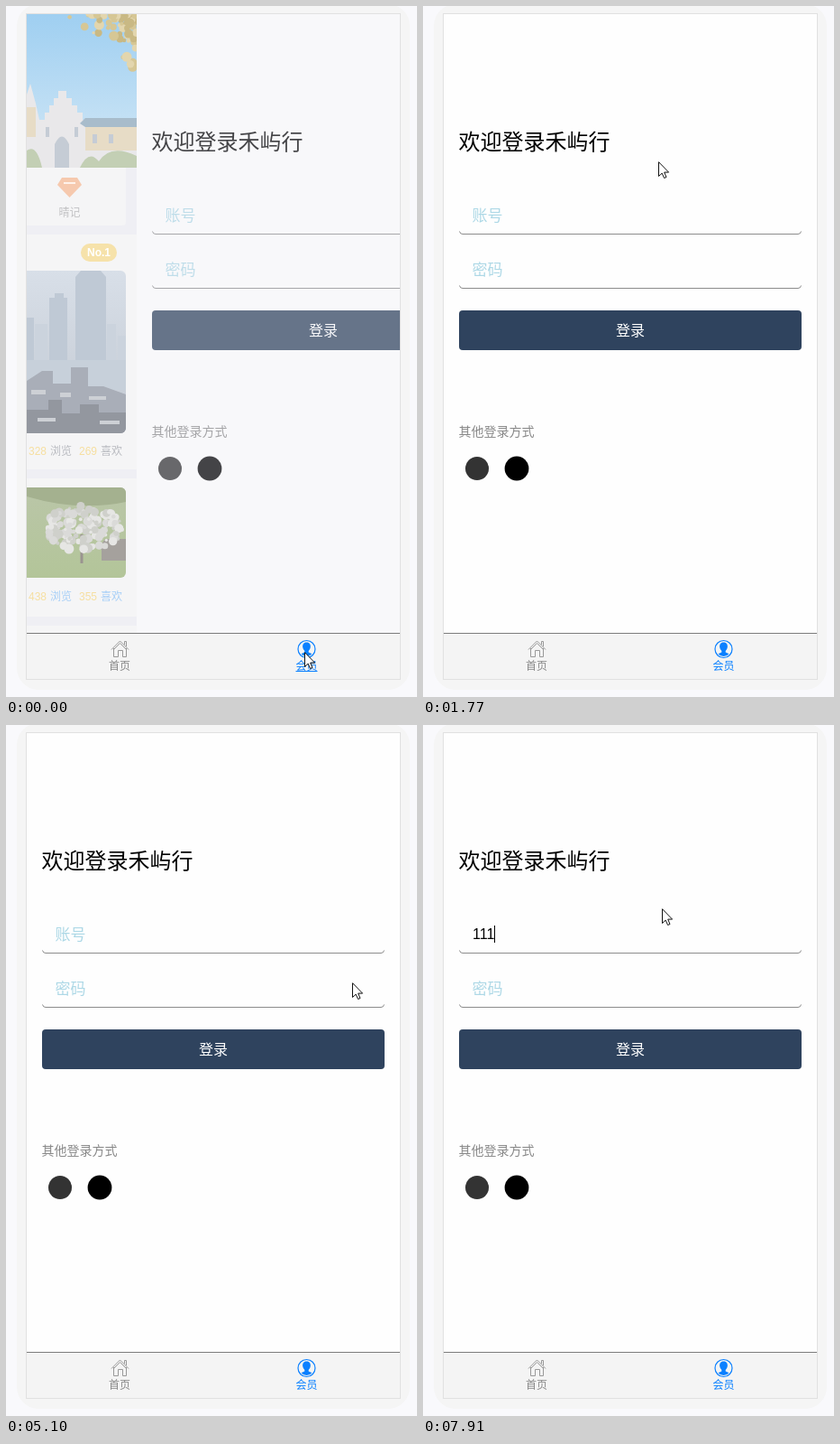
An HTML page for the animation above (7990 ms loop, 456 by 765 pixels).

```html
<!DOCTYPE html>
<html lang="zh-CN">
<head>
<meta charset="utf-8">
<title>登录</title>
<style>
html, body { margin: 0; width: 100%; height: 100%; overflow: hidden; background: #f9f9fc; }
svg { display: block; width: 456px; height: 765px; }
text { font-family: "Noto Sans CJK SC", "Noto Sans CJK", "Noto Sans", sans-serif; white-space: pre; }
.latin { font-family: "Liberation Sans", Arial, sans-serif; }
.mid { text-anchor: middle; }
.line { fill: none; stroke: #8c8c8c; }
.hint { font-size: 17px; fill: #add8e6; }
.small { font-size: 12px; }
.stat { font-size: 12px; font-weight: 500; }
.num { fill: #f6dfa0; }
</style>
</head>
<body>
<svg viewBox="0 0 456 765">
  <defs>
    <clipPath id="view"><rect x="23" y="9" width="414" height="685"/></clipPath>
    <clipPath id="shotA"><rect x="-240" y="293" width="373" height="180" rx="6"/></clipPath>
    <clipPath id="shotB"><rect x="-240" y="533" width="373" height="100" rx="6"/></clipPath>
    <clipPath id="hero"><rect x="-269" y="9" width="414" height="170"/></clipPath>
    <linearGradient id="sky" x2="0" y2="1"><stop stop-color="#9fcff1"/><stop offset="1" stop-color="#d3e8f6"/></linearGradient>
    <linearGradient id="haze" x2="0" y2="1"><stop stop-color="#d8dfe8"/><stop offset="1" stop-color="#c3c9d2"/></linearGradient>
    <linearGradient id="lawn" x2="0" y2="1"><stop stop-color="#bac6a8"/><stop offset="1" stop-color="#b3c599"/></linearGradient>
    <path id="rule" class="line" d="M40.5 249.5Q41 252.5 44 252.5H416Q419 252.5 419.5 249.5"/>
  </defs>

  <rect x="12" y="-2" width="436" height="759" rx="24" fill="#f5f5f5"/>
  <rect x="22.5" y="8.5" width="415" height="737" fill="#ebebf3" stroke="#e1e1e1"/>

  <g clip-path="url(#view)">
    <g id="home">
      <rect x="-269" y="9" width="414" height="685" fill="#efeff4"/>
      <g fill="#f5f5f6">
        <rect x="-257" y="170" width="390" height="73" rx="4"/>
        <rect x="-269" y="253" width="414" height="260"/>
        <rect x="-269" y="523" width="414" height="153"/>
        <rect x="-269" y="686" width="414" height="8"/>
      </g>
      <g clip-path="url(#hero)">
        <rect x="-269" y="9" width="414" height="170" fill="url(#sky)"/>
        <path fill="#eef3f8" d="M-269 150Q60 120 145 128V179H-269Z"/>
        <path fill="#e9e8ea" d="M23 179V98L27 86 33 108 37 126H43V118H48V110H53V102H58V94H67V102H73V110H79V118H85V126H145V179Z"/>
        <path fill="#e7dcc6" d="M88 133H145V160H88ZM23 112H33V145H23Z"/>
        <path fill="#a8bccb" d="M82 130L88 124H145V134H88Z"/>
        <path fill="#c5ccd5" d="M54 179V153Q62 136 70 153V179ZM44 134H48V145H44ZM76 134H80V145H76ZM96 142H101V152H96ZM114 142H119V152H114Z"/>
        <path fill="#c3cfb4" d="M23 179V160Q34 152 40 179ZM82 179Q92 158 103 172Q116 152 145 166V179Z"/>
        <g id="leaves"></g>
      </g>
      <path fill="#f6c9ae" d="M62 190H79L84 198 70.5 212 57 198Z"/>
      <path stroke="#fff2ea" stroke-width="2" d="M64 196H77"/>
      <text class="small mid" x="70.5" y="233" fill="#c2c2c4">晴记</text>

      <rect x="83" y="263" width="40" height="20" rx="10" fill="#f6e2aa"/>
      <text class="small mid latin" x="103" y="277" fill="#fff" font-weight="700">No.1</text>
      <g clip-path="url(#shotA)">
        <rect x="-240" y="293" width="373" height="180" fill="url(#haze)"/>
        <path fill="#bfc9d5" d="M23 345H31V395H23ZM48 323H54V318H64V323H68V410H48ZM77 300L83 293H105L111 300V405H77Z"/>
        <path fill="#cbd3dd" d="M32 352H46V400H32ZM112 352H122V395H112ZM124 365H133V395H124Z"/>
        <path fill="#c7d0da" d="M-240 392H133V425H-240Z"/>
        <path fill="#a9aeb8" d="M-240 415H23L40 404H52V418H72V400H91V421H108L133 430V473H-240Z"/>
        <path fill="#93979f" d="M23 447H47V436H62V451H82V441H103V450H133V473H23Z"/>
        <path fill="#cdd0d5" d="M28 425H44V430H28ZM60 428H72V433H60ZM92 432H111V436H92ZM35 456H55V460H35ZM104 459H126V463H104Z"/>
      </g>
      <g class="stat">
        <text class="num latin" x="25" y="497">328</text><text x="49" y="497" fill="#b9bbc0">浏览</text>
        <text class="num latin" x="81" y="497">269</text><text x="105" y="497" fill="#b9bbc0">喜欢</text>
        <text class="num latin" x="25" y="658">438</text><text x="49" y="658" fill="#a7cff7">浏览</text>
        <text class="num latin" x="81" y="658">355</text><text x="105" y="658" fill="#a7cff7">喜欢</text>
      </g>
      <g clip-path="url(#shotB)">
        <rect x="-240" y="533" width="373" height="100" fill="url(#lawn)"/>
        <path fill="#a4b18f" d="M23 533H133V549Q80 560 23 543Z"/>
        <path fill="#a5a19d" d="M103 600L110 590H133V614H106V602Z"/>
        <path stroke="#9a9490" stroke-width="3" d="M84 585V617"/>
        <g id="bloom"></g>
      </g>
    </g>

    <g id="login">
      <rect x="23" y="9" width="414" height="685" fill="#fefefe"/>
      <text x="39.5" y="158.5" font-size="24">欢迎登录禾屿行</text>
      <text id="hint" class="hint" x="54.5" y="237.5">账号</text>
      <text id="typed" class="latin" x="55" y="237" font-size="16"></text>
      <text class="hint" x="54.5" y="297.5">密码</text>
      <use href="#rule"/><use href="#rule" y="60"/>
      <rect x="40" y="337" width="380" height="44" rx="4" fill="#2f435e"/>
      <text class="mid" x="230" y="364.5" font-size="16" fill="#fff">登录</text>
      <text x="39.5" y="476" font-size="14" fill="#888">其他登录方式</text>
      <circle cx="60" cy="512" r="13" fill="#333"/>
      <circle cx="104" cy="512" r="13.4"/>
      <rect id="caret" y="223" width="1" height="19"/>
      <g id="suggest">
        <rect x="38.5" y="253.5" width="383" height="55" rx="3" fill="#fff" stroke="#e4e4e4"/>
        <text class="latin" x="55" y="285" font-size="13">111</text>
      </g>
    </g>
  </g>

  <rect x="23" y="694" width="414" height="51" fill="#f4f4f4"/>
  <path stroke="#7c7c7c" d="M23 694.5H437"/>
  <g fill="none" stroke="#999">
    <path d="M117 712.5L126.5 703 136 712.5M119.5 711V720.5H124.5V713.5H129.5V720.5H133.5V711"/>
    <path d="M119 713L126.5 705.5 134 713M131.5 707V703.5H133.5V709"/>
  </g>
  <text class="small mid" x="126" y="734.5" fill="#888">首页</text>
  <circle cx="333.5" cy="712" r="9.5" fill="none" stroke="#0b80ff" stroke-width="1.2"/>
  <path fill="#0b80ff" d="M333.5 704.5C337 704.5 338.2 707 337.8 710Q337.4 712.5 335.7 714V715.5L339.5 717.2Q337 720 333.5 720T327.5 717.2L331.3 715.5V714Q329.6 712.5 329.2 710C328.8 707 330 704.5 333.5 704.5Z"/>
  <text class="small mid" x="333.5" y="734.5" fill="#0b80ff">会员</text>
  <path id="under" stroke="#0b80ff" d="M321.5 736.5H345.5"/>

  <path id="pointer" fill="#fff" stroke="#111" d="M.5 .7V16.5L4.2 13.1 6.6 18.5 9 17.5 6.7 12.1H11.6Z"/>
</svg>
<script>
const LOOP = 7990;
const $ = id => document.getElementById(id);

// Pointer moves: first step, last step, number of steps, end x, end y
const START = [331, 715];
const MOVES = [
  [340, 510, 3, 212, 386], [590, 970, 6, 114, 232],
  [1560, 1770, 3, 261, 172], [1850, 2040, 4, 387, 151],
  [2350, 2980, 10, 300, 234], [3130, 3620, 7, 212, 290],
  [3860, 3860, 1, 205, 284], [3960, 4160, 4, 378, 170],
  [4550, 4760, 4, 384, 285], [5200, 5520, 6, 147, 242],
  [5890, 5980, 2, 153, 242], [7520, 7910, 6, 265, 203]
];
// Caret shown: from, to, top
const CARET = [
  [1120, 1620, 223], [3130, 3620, 223], [3860, 4310, 283],
  [5680, 6160, 223], [6690, LOOP, 222]
];
const KEYS = [7130, 7380, 7590];

function scatter(id, colors, count, place) {
  let seed = 7;
  const rnd = () => (seed = seed * 16807 % 2147483647) / 2147483647;
  let out = '';
  for (let i = 0; i < count; i++) {
    const [x, y, r] = place(rnd);
    out += `<circle cx="${x.toFixed(1)}" cy="${y.toFixed(1)}" r="${r.toFixed(1)}" fill="${colors[i % colors.length]}"/>`;
  }
  $(id).innerHTML = out;
}
scatter('leaves', ['#d6c795', '#c9b984', '#e3d6ae'], 70, rnd => {
  const x = 70 + 75 * Math.sqrt(rnd());
  return [x, 9 + rnd() * rnd() * (x - 55) * .8, 1.5 + rnd() * 4];
});
scatter('bloom', ['#dadad8', '#e6e6e4', '#cfd0cb'], 150, rnd => {
  const a = rnd() * 6.283, r = Math.sqrt(rnd());
  return [86 + 43 * r * Math.cos(a), 578 + 25 * r * Math.sin(a), 1.5 + rnd() * 4];
});

function pointerAt(t) {
  let [x, y] = START;
  for (const [from, to, steps, ex, ey] of MOVES) {
    if (t < from) break;
    const gap = (to - from) / (steps - 1) || 1;
    const k = Math.min(steps, 1 + Math.floor((t - from) / gap + 1e-6)) / steps;
    x += (ex - x) * k;
    y += (ey - y) * k;
  }
  return [Math.round(x), Math.round(y)];
}

const show = (id, on) => $(id).setAttribute('visibility', on ? 'inherit' : 'hidden');

function draw(t) {
  const shift = t < 60 ? 122 : t < 120 ? 40 : 0;
  $('home').setAttribute('transform', `translate(${shift - 122})`);
  $('home').setAttribute('opacity', shift / 122);
  $('login').setAttribute('transform', `translate(${shift})`);
  $('login').setAttribute('opacity', 1 - shift / 414);

  const count = KEYS.filter(k => t >= k).length;
  $('typed').textContent = '1'.repeat(count);
  show('hint', !count);
  show('suggest', t >= 7190 && t < KEYS[2]);
  show('under', t < 1120);

  const caret = CARET.find(c => t >= c[0] && t < c[1]);
  show('caret', caret);
  if (caret) {
    const end = count ? $('typed').getComputedTextLength() : 0;
    $('caret').setAttribute('x', 55 + Math.round(end));
    $('caret').setAttribute('y', caret[2]);
  }
  $('pointer').setAttribute('transform', `translate(${pointerAt(t)})`);
}

const began = performance.now();
function tick() {
  draw((performance.now() - began) % LOOP);
  requestAnimationFrame(tick);
}
tick();
</script>
</body>
</html>
```
